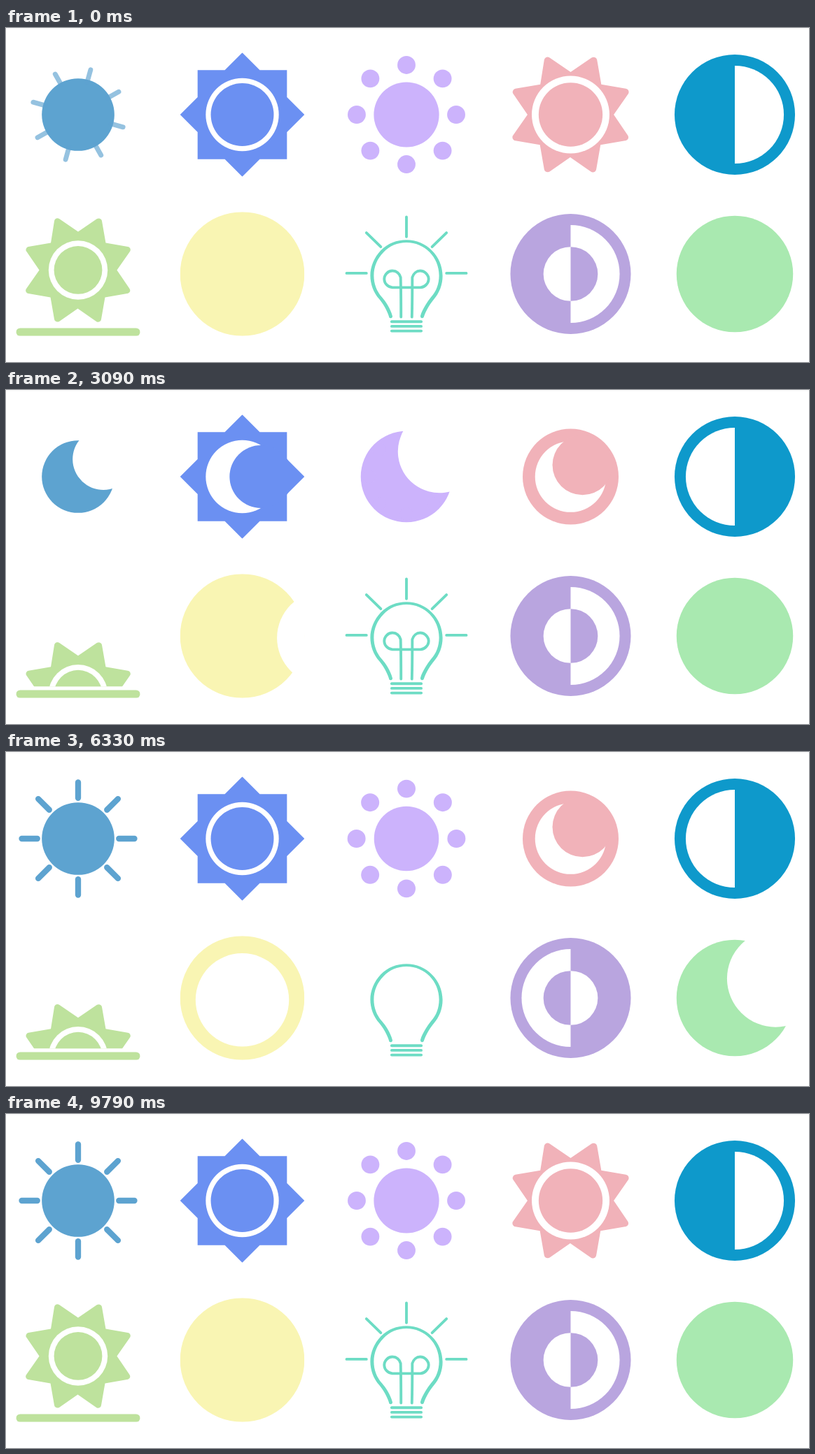
An HTML page with a canvas that plays this animation: 1147x478 px, repeating every 10 s.

```html
<!DOCTYPE html>
<html lang="en">
<head>
<meta charset="utf-8">
<title>Sun and moon toggles</title>
<style>
html, body { margin: 0; width: 100%; height: 100%; overflow: hidden; background: #fff; }
canvas { display: block; }
</style>
</head>
<body>
<canvas id="stage" width="1147" height="478"></canvas>
<script>
const ctx = document.getElementById('stage').getContext('2d');
const LOOP = 10000, STEP = 500, UNIT = 5.55, TAU = Math.PI * 2;

function bezier(x1, y1, x2, y2) {
  const at = (a, b, s) => 3 * a * s * (1 - s) ** 2 + 3 * b * s * s * (1 - s) + s ** 3;
  return x => {
    if (x <= 0) return 0;
    if (x >= 1) return 1;
    let lo = 0, hi = 1;
    for (let i = 0; i < 24; i++) {
      const mid = (lo + hi) / 2;
      if (at(x1, x2, mid) < x) lo = mid; else hi = mid;
    }
    return at(y1, y2, lo);
  };
}
const spring = bezier(0, 0, .15, 1.25);
const snap = bezier(0, 0, 0, 1.25);
const soft = bezier(0, 0, .5, 1);
const glide = bezier(0, 0, .15, 1);
const ease = bezier(.25, .1, .25, 1);

let now = 0;
const startOf = k => STEP * k - 31 + (k > 14 ? 35 : 0);

// 0 = day, 1 = night; each icon toggles once each way per loop
function phase(k, dur, curve, delayOn = 0, delayOff = 0) {
  const back = now - startOf(k + 10) - delayOff;
  if (back > 0) return 1 - curve(back / dur);
  return curve((now - startOf(k) - delayOn) / dur);
}
const mix = (a, b, p) => a + (b - a) * p;

function disc(x, y, r, color) {
  if (color) ctx.fillStyle = color;
  ctx.beginPath();
  ctx.arc(x, y, r, 0, TAU);
  ctx.fill();
}
function halfDisc(r, from, color) {
  ctx.fillStyle = color;
  ctx.beginPath();
  ctx.arc(16, 16, r, from, from + Math.PI);
  ctx.closePath();
  ctx.fill();
}
function line(x1, y1, x2, y2) {
  ctx.beginPath();
  ctx.moveTo(x1, y1);
  ctx.lineTo(x2, y2);
  ctx.stroke();
}
function aroundCenter(scale, angle, draw) {
  ctx.save();
  ctx.translate(16, 16);
  ctx.rotate(angle);
  ctx.scale(scale, scale);
  ctx.translate(-16, -16);
  draw();
  ctx.restore();
}
function clipAt(path, dx, dy) {
  ctx.translate(dx, dy);
  ctx.clip(path);
  ctx.translate(-dx, -dy);
}

const shape = {
  classicCut: new Path2D('M0-5h30a1 1 0 0 0 9 13v24H0Z'),
  expandCut: new Path2D('M0-11h25a1 1 0 0 0 17 13v30H0Z'),
  star: new Path2D('M27.5 11.5v-7h-7L16 0l-4.5 4.5h-7v7L0 16l4.5 4.5v7h7L16 32l4.5-4.5h7v-7L32 16Z'),
  sun: new Path2D('M30.7 21.3 27.1 16l3.7-5.3c.4-.5.1-1.3-.6-1.4l-6.3-1.1-1.1-6.3c-.1-.6-.8-.9-1.4-.6L16 5l-5.4-3.7c-.5-.4-1.3-.1-1.4.6l-1 6.3-6.4 1.1c-.6.1-.9.9-.6 1.3L4.9 16l-3.7 5.3c-.4.5-.1 1.3.6 1.4l6.3 1.1 1.1 6.3c.1.6.8.9 1.4.6l5.3-3.7 5.3 3.7c.5.4 1.3.1 1.4-.6l1.1-6.3 6.3-1.1c.8-.1 1.1-.8.7-1.4z'),
  bulb: new Path2D('M9.4 9.9c1.8-1.8 4.1-2.7 6.6-2.7 5.1 0 9.3 4.2 9.3 9.3 0 2.3-.8 4.4-2.3 6.1-.7.8-2 2.8-2.5 4.4 0 .2-.2.4-.5.4-.2 0-.4-.2-.4-.5v-.1c.5-1.8 2-3.9 2.7-4.8 1.4-1.5 2.1-3.5 2.1-5.6 0-4.7-3.7-8.5-8.4-8.5-2.3 0-4.4.9-5.9 2.5-1.6 1.6-2.5 3.7-2.5 6 0 2.1.7 4 2.1 5.6.8.9 2.2 2.9 2.7 4.9 0 .2-.1.5-.4.5h-.1c-.2 0-.4-.1-.4-.4-.5-1.7-1.8-3.7-2.5-4.5-1.5-1.7-2.3-3.9-2.3-6.1 0-2.3 1-4.7 2.7-6.5z')
};
const coilData = 'M14.6 27.1c0-3.4 0-6.8-.1-10.2-.2-1-1.1-1.7-2-1.7-1.2-.1-2.3 1-2.2 2.3.1 1 .9 1.9 2.1 2h7.2c1.1-.1 2-1 2.1-2 .1-1.2-1-2.3-2.2-2.3-.9 0-1.7.7-2 1.7 0 3.4 0 6.8-.1 10.2';
const coil = new Path2D(coilData);
const probe = document.createElementNS('http://www.w3.org/2000/svg', 'path');
probe.setAttribute('d', coilData);
const coilLength = probe.getTotalLength();

function classic(k) {
  const rays = phase(k, 400, spring, 0, 100);
  const cut = phase(k, 400, spring, 100, 0);
  clipAt(shape.classicCut, -12 * cut, 10 * cut);
  disc(16, 16, 9.34);
  ctx.globalAlpha = Math.min(1, Math.max(0, 1 - rays));
  ctx.lineWidth = 1.5;
  for (let i = 0; i < 8; i++) {
    aroundCenter(1 - .5 * rays, (i + rays) * TAU / 8, () => line(16, 5.5, 16, 1.5));
  }
}

function innerMoon(k, color) {
  const p = phase(k, 500, spring);
  aroundCenter(1, p * Math.PI / 2, () => ctx.fill(shape.star));
  disc(16, 16, 9.4, '#fff');
  disc(16 + 4.83 * p, 16, 8.1, color);
}

function expand(k) {
  const grow = phase(k, 350, snap, 0, 150);
  const cut = phase(k, 300, soft, 200, 0);
  clipAt(shape.expandCut, -9 * cut, 14 * cut);
  disc(16, 16, 8.4 * (1 + .4 * grow));
  aroundCenter(1 - .25 * grow, 0, () => {
    for (let i = 0; i < 8; i++) {
      const r = i % 2 ? 13.15 : 12.8, a = i * TAU / 8;
      disc(16 + r * Math.cos(a), 16 + r * Math.sin(a), 2.33);
    }
  });
}

function within(k, color) {
  const p = phase(k, 500, snap);
  aroundCenter(1 - p / 3, 0, () => {
    ctx.fill(shape.sun);
    disc(16, 16, 10, '#fff');
  });
  aroundCenter(1 + p / 2, 0, () => {
    disc(16, 16, 8.23, color);
    if (p <= 0) return;
    disc(16, 16, 6.1, '#fff');
    disc(16 + 2.04 * p, 16 - 2 * p, mix(6.4, 5.16, p), color);
  });
}

function darkSide(k, color) {
  const p = phase(k, 500, glide);
  disc(16, 16, 15.5);
  halfDisc(12.62, -Math.PI / 2 - p * Math.PI, '#fff');
}

function horizon(k) {
  const p = phase(k, 500, spring);
  ctx.beginPath();
  ctx.roundRect(.05, 29.95, 31.9, 2.05, 1.02);
  ctx.fill();
  ctx.beginPath();
  ctx.rect(0, 0, 32, 29);
  ctx.clip();
  ctx.translate(0, 16 * p - 1);
  aroundCenter(.9, 0, () => ctx.fill(shape.sun));
  const color = ctx.fillStyle;
  disc(16, 16, 7.6, '#fff');
  disc(16, 16, 6.2, color);
}

function eclipse(k) {
  const p = phase(k, 550, ease);
  disc(16, 16, 16);
  disc(48 - 32 * p, 16.5, 12.02, '#fff');
}

function lightbulb(k) {
  const p = phase(k, 400, ease);
  ctx.fill(shape.bulb);
  ctx.lineWidth = .7;
  for (let i = 0; i < 3; i++) line(19.8, 28.3 + 1.2 * i, 12.2, 28.3 + 1.2 * i);
  if (p > .99) return;
  const left = 1 - p;
  if (p > 0) ctx.setLineDash([coilLength * left, 99]);
  ctx.stroke(coil);
  if (p > 0) ctx.setLineDash([5.15 * left, 99]);
  line(16, 6.4, 16, 1.3);
  line(26.3, 15.8, 31.4, 15.8);
  line(22.6, 9, 26.3, 5.4);
  line(9.4, 9, 5.7, 5.4);
  line(5.7, 15.8, .6, 15.8);
}

function halfSun(k, color) {
  const turn = phase(k, 520, glide) * Math.PI;
  disc(16, 16, 15.5);
  halfDisc(12.62, -Math.PI / 2 - turn, '#fff');
  disc(16, 16, 7, '#fff');
  halfDisc(7, -Math.PI / 2 + turn, color);
}

function simple(k) {
  const p = phase(k, 300, soft);
  disc(16, 16, 15);
  disc(44.5 - 18 * p, 7 + 4 * p, 12.5, '#fff');
}

const icons = [
  [classic, '#5da3d0'], [innerMoon, '#6b90f2'], [expand, '#ccb3fc'],
  [within, '#f1b2b9'], [darkSide, '#0e99cb'], [horizon, '#bee29d'],
  [eclipse, '#f9f5b3'], [lightbulb, '#6ddcc4'], [halfSun, '#b9a5df'],
  [simple, '#a9e9b0']
];

function frame() {
  now = performance.now() % LOOP;
  ctx.fillStyle = '#fff';
  ctx.fillRect(0, 0, 1147, 478);
  ctx.fillStyle = '#fafafa';
  ctx.fillRect(0, 0, 1147, 2);
  icons.forEach(([draw, color], k) => {
    ctx.save();
    ctx.translate(103 + 234.5 * (k % 5) - 16 * UNIT, (k < 5 ? 124 : 352) - 16 * UNIT);
    ctx.scale(UNIT, UNIT);
    ctx.beginPath();
    ctx.rect(0, 0, 32, 32);
    ctx.clip();
    ctx.fillStyle = ctx.strokeStyle = color;
    ctx.lineCap = 'round';
    draw(k, color);
    ctx.restore();
  });
  requestAnimationFrame(frame);
}
frame();
</script>
</body>
</html>
```
